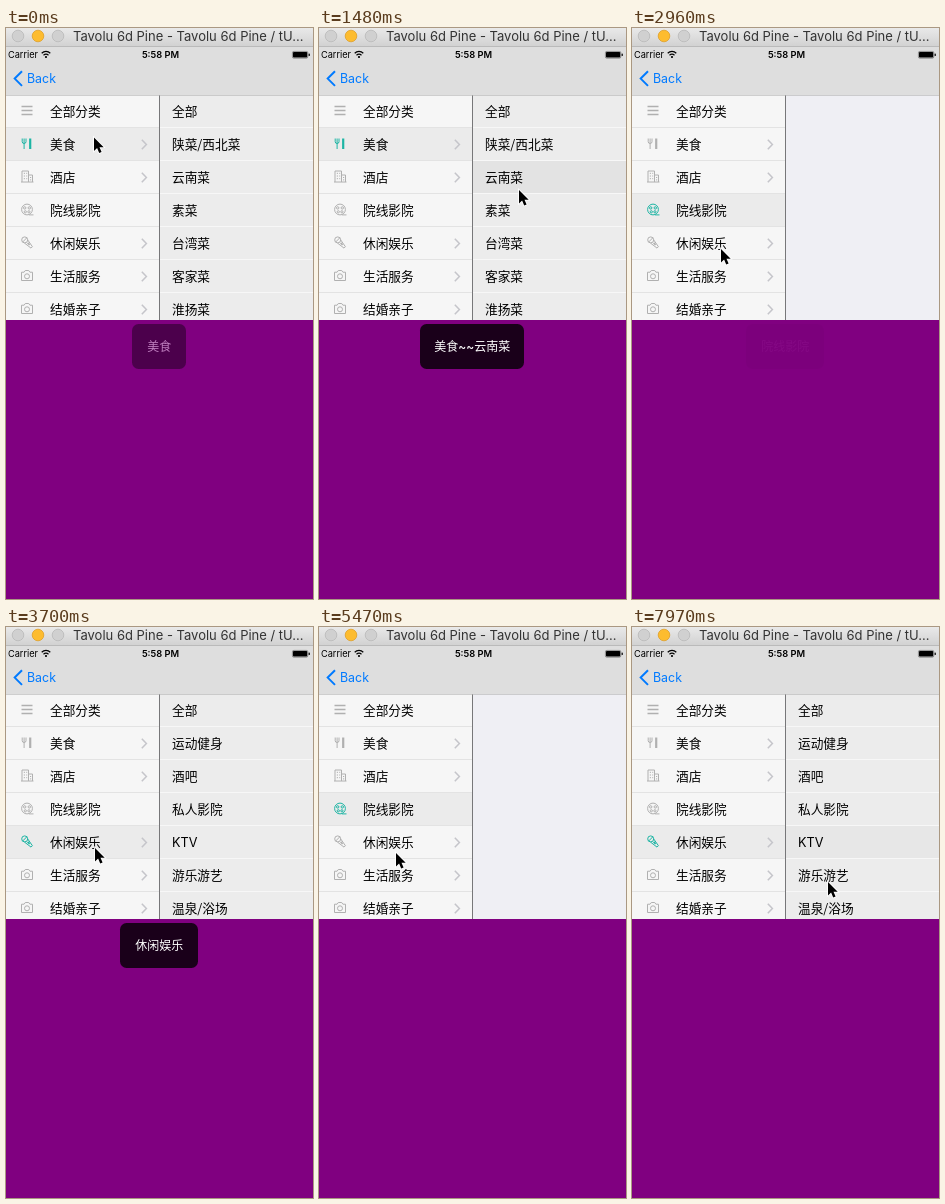
Write an HTML page that moves like this. It is 307 by 571 pixels and loops after 8000 ms.

```html
<!DOCTYPE html>
<html lang="zh">
<head>
<meta charset="utf-8">
<style>
  html, body { margin: 0; width: 100%; height: 100%; overflow: hidden; background: #800080; }
  svg { display: block; position: absolute; left: 0; top: 0; }
  text { font-family: Inter, "Noto Sans CJK SC", "Noto Sans CJK", sans-serif; }
  .row { font: 12.7px "Noto Sans CJK SC", "Noto Sans CJK", sans-serif; }
  .latin { font: 12.7px Inter, sans-serif; }
  .icon { fill: none; stroke: currentColor; }
</style>
</head>
<body>
<svg width="307" height="571" viewBox="0 0 307 571">
  <defs>
    <linearGradient id="bar" x2="0" y2="1">
      <stop stop-color="#e9e9e9"/><stop offset="1" stop-color="#d2d2d2"/>
    </linearGradient>
  </defs>
  <rect width="307" height="571" fill="#efeff4"/>

  <g id="left"></g>
  <g id="right"></g>
  <rect x="153" y="67" width="1" height="225" fill="#777779"/>
  <rect y="292" width="307" height="279" fill="#800080"/>

  <rect y="18" width="307" height="49" fill="#dedede"/>
  <rect y="67" width="307" height=".6" fill="#b4b4b4"/>
  <rect width="307" height="18" fill="url(#bar)"/>
  <rect y="18" width="307" height="1" fill="#bababa"/>
  <g stroke-width=".8">
    <circle cx="12" cy="8" r="5.8" fill="#d0d0d0" stroke="#b9b9b9"/>
    <circle cx="32" cy="8" r="5.8" fill="#fdbc2f" stroke="#e0a028"/>
    <circle cx="52" cy="8" r="5.8" fill="#d0d0d0" stroke="#b9b9b9"/>
  </g>
  <text x="67" y="13" font-size="13" fill="#333">Tavolu 6d Pine - Tavolu 6d Pine / tU...</text>

  <text x="2" y="30" font-size="9.2">Carrier</text>
  <g fill="none" stroke="#000" stroke-width="1.2">
    <path d="M35.7 25.2a6.2 6.2 0 0 1 8.6 0M37.5 27.2a3.7 3.7 0 0 1 5 0"/>
    <circle cx="40" cy="29" r=".5"/>
  </g>
  <text x="154.5" y="30" font-size="9.3" font-weight="600" text-anchor="middle">5:58 PM</text>
  <rect x="286.4" y="23.4" width="15.4" height="6.8" rx="1.4" fill="none" stroke="#000" stroke-opacity=".6" stroke-width=".6"/>
  <rect x="287" y="24" width="14.2" height="5.6" rx=".8"/>
  <rect x="302.6" y="25.5" width="1.2" height="2.6" rx=".6"/>

  <path d="M16 43.3L8.7 50.6L16 57.9" fill="none" stroke="#007aff" stroke-width="2"/>
  <text x="21" y="55" font-size="12.4" fill="#007aff">Back</text>

  <g id="toast">
    <rect y="296" height="45" rx="6.5" fill-opacity=".8"/>
    <text x="153.3" y="323.2" font-size="12" font-weight="500" fill="#fff" text-anchor="middle"></text>
  </g>
  <path id="cursor" d="M1 1V14.4L4.1 11.6L6.2 16.5L8.6 15.5L6.5 10.7H10.7Z"
        stroke="#fff" stroke-width="1.7" paint-order="stroke"/>
</svg>
<script>
const $ = s => document.querySelector(s);
const LOOP = 8000, TICK = 147.6, ROW = 33, TOP = 67;

const menu = ['全部分类', '美食', '酒店', '院线影院', '休闲娱乐', '生活服务', '结婚亲子'];
const nested = [1, 2, 4, 5, 6];
const food = ['全部', '陕菜/西北菜', '云南菜', '素菜', '台湾菜', '客家菜', '淮扬菜'];
const fun = ['全部', '运动健身', '酒吧', '私人影院', 'KTV', '游乐游艺', '温泉/浴场'];

// Icons are drawn around their centre.
const camera = '<path d="M-5.5-3.3h2.6l1.2-1.7h3.4l1.2 1.7h2.6v8.3h-11z"/><circle cy=".8" r="2.5"/>';
const icons = [
  '<path d="M-5.5-4h11M-5.5 0h11M-5.5 4h11" stroke-width="1.3"/>',
  '<path d="M-4.8-5v3.2q0 1.8 1.9 1.8T-1-1.8V-5M-2.9-5V5.5"/><path d="M3.2-5V5.5" stroke-width="2.2"/>',
  '<path d="M-5 5.5v-11h6.5v11M1.5-1.5h4v7M-6 5.5H6.5M-3.2-3.2h1.2M-.8-3.2h1M-3.2-.5h1.2M-.8-.5h1M-3.2 2.2h1.2M-.8 2.2h1M3 1h1.2M3 3.4h1.2"/>',
  '<circle r="5.4"/><circle cx="-2.3" cy="-1.6" r="1.2"/><circle cx="2.3" cy="-1.6" r="1.2"/><circle cx="-1.7" cy="2.3" r="1.1"/><circle cx="1.9" cy="2.3" r="1.1"/><path d="M2 5.4h4.5"/>',
  '<circle cx="-2.3" cy="-2.6" r="3"/><path d="M-4.4-.4L-.2-4.7M-2.6.5L4 5.6L5.4 4.2L.7-2.6"/><path d="M.6.4l2 2" stroke-width="1.6"/>',
  camera, camera
];

// Tap: tick, menu row, sublist, picked sub row, toast text, opacity left after the fade
const taps = [
  [-4, 1, food, -1, '美食', 0],
  [8, 1, food, 2, '美食~~云南菜', 0],
  [15, 3, null, -1, '院线影院', .03],
  [23, 4, fun, -1, '休闲娱乐', 0],
  [29, 3, null, -1, '院线影院', 0],
  [38, 4, fun, -1, '休闲娱乐', 0],
  [49, 4, fun, 4, '休闲娱乐~~KTV', 0]
];
const fade = [0, .5, 1, 1, .5];

// Pointer path: tick, x, y
const path = [
  [0, 87, 108.5], [1, 91, 110], [3, 130, 124], [6, 196, 157], [7, 199, 161], [10, 199, 161],
  [11, 165, 153], [12, 112, 162], [13, 85, 177], [17, 85, 177], [20, 88, 220], [26, 88, 220],
  [28, 97, 190], [29, 98, 185], [31, 98, 185], [34, 88, 207], [37, 76, 225], [39, 76, 225],
  [42, 174, 218], [45, 174, 218], [46, 186, 221], [47, 191, 223], [51, 191, 223], [54, 195, 254]
];

const label = (x, y, s) =>
  `<text class="${s === 'KTV' ? 'latin' : 'row'}" x="${x}" y="${y + 20.5}">${s}</text>`;

function drawMenu(active) {
  $('#left').innerHTML = menu.map((s, i) => {
    const y = TOP + i * ROW, on = i === active;
    return `<rect y="${y}" width="153" height="${ROW}" fill="${on ? '#ebebeb' : '#f6f6f6'}"/>
      <rect y="${y + 32}" width="153" height="1" fill="#e3e3e3"/>
      <g class="icon" color="${on ? '#1db5a4' : '#b0b0b0'}" transform="translate(21 ${y + 15.5})">${icons[i]}</g>
      ${label(44, y, s)}
      ${nested.includes(i) ? `<path d="M135.8 ${y + 11.7}l4.6 4.8l-4.6 4.8" fill="none" stroke="#c5c5ca" stroke-width="1.5"/>` : ''}`;
  }).join('');
}

function drawList(list, picked) {
  $('#right').innerHTML = (list || []).map((s, i) => {
    const y = TOP + i * ROW;
    const shade = i !== picked ? '#ececec' : list === food ? '#e3e3e3' : '#e7e7e7';
    return `<rect x="154" y="${y}" width="153" height="${ROW}" fill="${shade}"/>
      <rect x="154" y="${y + 32}" width="153" height="1" fill="#f7f7f7"/>${label(166, y, s)}`;
  }).join('');
}

function drawToast(s) {
  const w = [...s].reduce((sum, c) => sum + (c === '~' ? 7 : c < '~' ? 8 : 12), 30);
  const box = $('#toast rect');
  box.setAttribute('x', Math.round(153.3 - w / 2));
  box.setAttribute('width', w);
  $('#toast text').textContent = s;
}

function pointer(tick) {
  const i = path.findIndex(p => p[0] >= tick);
  if (i < 1) return path[i < 0 ? path.length - 1 : 0].slice(1);
  const [a, b] = [path[i - 1], path[i]];
  const k = (tick - a[0]) / (b[0] - a[0]);
  return [1, 2].map(n => a[n] + (b[n] - a[n]) * k);
}

let current, lastTick;
function render(time) {
  const tick = Math.floor((time % LOOP + 2) / TICK);
  if (tick === lastTick) return;
  lastTick = tick;
  const tap = taps.filter(t => t[0] <= tick).pop();
  const [start, row, list, picked, text, rest] = tap;
  if (tap !== current) {
    current = tap;
    drawMenu(row);
    drawList(list, picked);
    drawToast(text);
  }
  $('#toast').setAttribute('opacity', fade[tick - start] ?? rest);
  $('#cursor').setAttribute('transform', `translate(${pointer(tick)})`);
}

const begin = performance.now();
function loop() {
  render(performance.now() - begin);
  requestAnimationFrame(loop);
}
loop();
</script>
</body>
</html>
```
